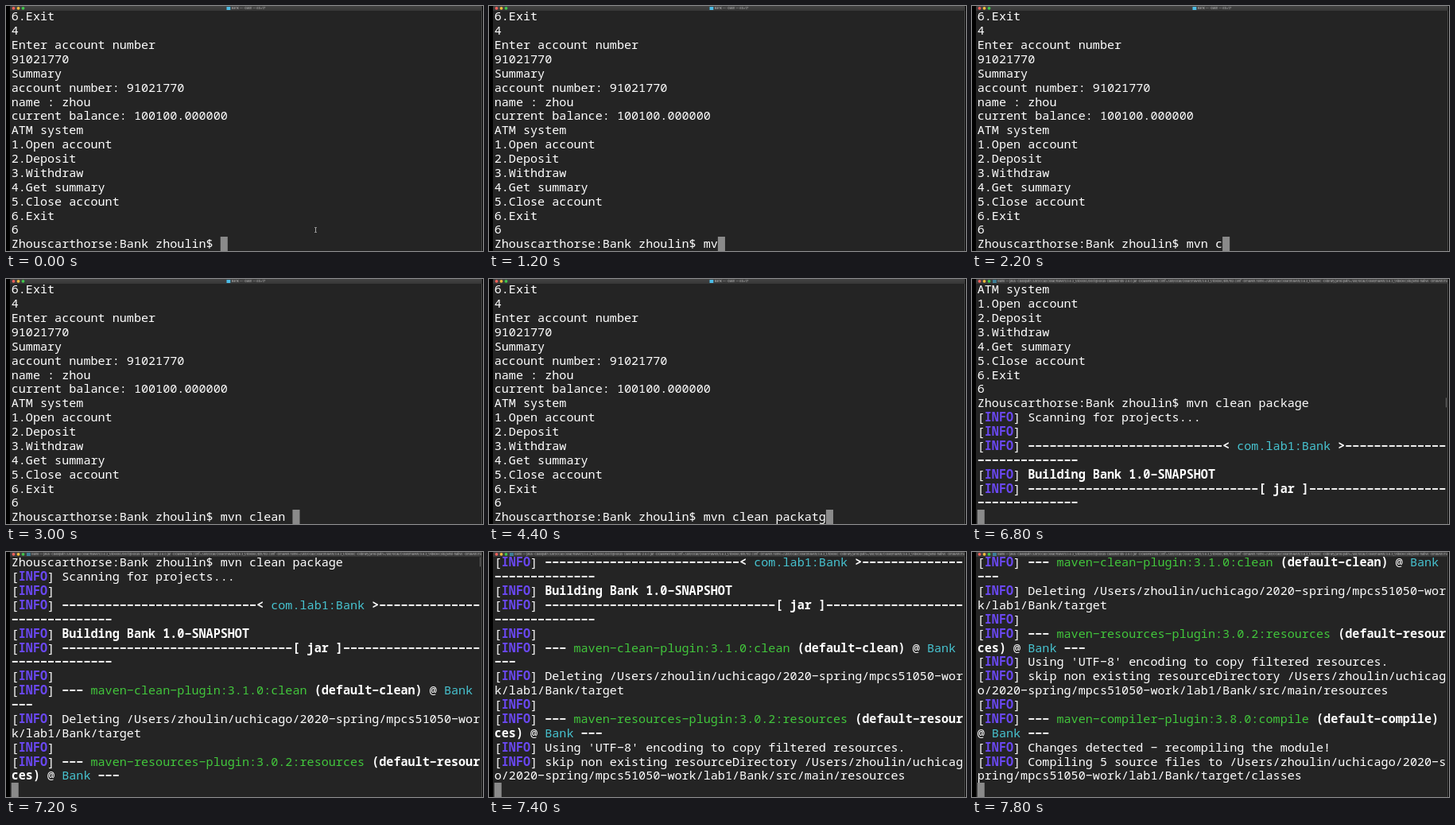
Animation, 600 px wide and 308 px high, one loop 8000 ms. Source, as an HTML page with a canvas:

```html
<!DOCTYPE html>
<html lang="en">
<head>
<meta charset="utf-8">
<title>Terminal build</title>
<style>
  html, body { margin: 0; width: 100%; height: 100%; overflow: hidden; background: #000; }
  canvas { display: block; width: 600px; height: 308px; }
</style>
</head>
<body>
<canvas id="stage" width="600" height="308"></canvas>
<script>
const ctx = document.getElementById('stage').getContext('2d');
const LOOP = 8000, COLS = 65, ROWS = 17;
const LEFT = 6.7, CELL_W = 9.07, CELL_H = 17.87, BASELINE = 18.4;
const MONO = '15.12px "Noto Sans Mono", monospace';
const WHITE = '#fff';

// Markup {xtext}: x picks the style
const STYLES = {
  n: { color: WHITE, weight: 500 },
  b: { color: WHITE, weight: 700 },
  p: { color: '#6a48f2', weight: 700 },
  g: { color: '#42c73c', weight: 500 },
  c: { color: '#47c3d0', weight: 500 }
};

const MENU = ['ATM system', '1.Open account', '2.Deposit', '3.Withdraw',
  '4.Get summary', '5.Close account', '6.Exit'];
const HISTORY = ['6.Exit', '4', 'Enter account number', '91021770', 'Summary',
  'account number: 91021770', 'name : zhou', 'current balance: 100100.000000',
  ...MENU, '6'];
const PROMPT = 'Zhouscarthorse:Bank zhoulin$ ';

const TYPING = [
  [0, ''], [1000, 'm'], [1200, 'mv'], [1600, 'mvn'], [1800, 'mvn '],
  [2200, 'mvn c'], [2400, 'mvn cl'], [2600, 'mvn clea'], [2800, 'mvn clean'],
  [3000, 'mvn clean '], [3600, 'mvn clean pa'], [3800, 'mvn clean pack'],
  [4000, 'mvn clean packa'], [4400, 'mvn clean packatg'],
  [4800, 'mvn clean packat'], [5000, 'mvn clean packa'],
  [5200, 'mvn clean packag'], [5400, 'mvn clean package']
];
const ENTER = 5600, TITLE_CHANGE = 5800, POINTER_MOVE = 200, POINTER_HIDE = 800;

const info = text => '[{pINFO}] ' + text;
const dashes = n => '-'.repeat(n);
const plugin = (goal, run) => info(`{b---} {g${goal}} {b(${run})} @ {cBank} {b---}`);
const REPO = '/Users/zhoulin/uchicago/2020-spring/mpcs51050-work/lab1/Bank';

const OUTPUT = [
  [6800, info('Scanning for projects...')],
  [6800, info('')],
  [6800, info(`{b${dashes(27)}<} {ccom.lab1:Bank} {b>${dashes(28)}}`)],
  [6800, info('{bBuilding Bank 1.0-SNAPSHOT}')],
  [6800, info(`{b${dashes(32)}[ jar ]${dashes(33)}}`)],
  [7000, info('')],
  [7000, plugin('maven-clean-plugin:3.1.0:clean', 'default-clean')],
  [7000, info(`Deleting ${REPO}/target`)],
  [7200, info('')],
  [7200, plugin('maven-resources-plugin:3.0.2:resources', 'default-resources')],
  [7400, info("Using 'UTF-8' encoding to copy filtered resources.")],
  [7400, info(`skip non existing resourceDirectory ${REPO}/src/main/resources`)],
  [7600, info('')],
  [7600, plugin('maven-compiler-plugin:3.8.0:compile', 'default-compile')],
  [7800, info('Changes detected - recompiling the module!')],
  [7800, info(`Compiling 5 source files to ${REPO}/target/classes`)]
];

const MAVEN = '/usr/local/Cellar/maven/3.6.3_1/libexec';
const SHELL_TITLE = 'Bank — -bash — 65×17';
const JAVA_TITLE = `Bank — java -classpath ${MAVEN}/boot/plexus-classworlds-2.6.0.jar ` +
  `-Dclassworlds.conf=${MAVEN}/bin/m2.conf -Dmaven.home=${MAVEN} ` +
  `-Dlibrary.jansi.path=${MAVEN}/lib/jansi-native -Dmaven.mu…`;

// Turn marked-up text into rows of styled characters
function wrap(text) {
  const cells = [];
  for (const [, style, styled, plain] of text.matchAll(/\{(\w)([^}]*)\}|([^{]+)/g)) {
    for (const ch of styled ?? plain) cells.push({ ch, style: STYLES[style || 'n'] });
  }
  const rows = [];
  do rows.push(cells.splice(0, COLS)); while (cells.length);
  return rows;
}

function screenAt(t) {
  const typed = TYPING.filter(([at]) => at <= t).pop()[1];
  const lines = [...HISTORY, PROMPT + typed];
  if (t >= ENTER) {
    lines.push(...OUTPUT.filter(([at]) => at <= t).map(([, text]) => text), '');
  }
  return lines.flatMap(wrap).slice(-ROWS);
}

function rect(color, x, y, w, h) {
  ctx.fillStyle = color;
  ctx.fillRect(x, y, w, h);
}

function drawTitleBar(t) {
  const bar = ctx.createLinearGradient(0, 0, 0, 6);
  bar.addColorStop(0, '#434343');
  bar.addColorStop(1, '#373737');
  ctx.fillStyle = bar;
  ctx.beginPath();
  ctx.roundRect(5, 0, 594, 6, [2, 2, 0, 0]);
  ctx.fill();
  ['#f4605a', '#f5bd3c', '#40c84c'].forEach((color, i) => {
    ctx.fillStyle = color;
    ctx.beginPath();
    ctx.arc(9.5 + i * 6, 2.8, 1.9, 0, Math.PI * 2);
    ctx.fill();
  });

  const running = t >= TITLE_CHANGE;
  const x = running ? 26 : 277.5;
  rect(running ? '#3d7f98' : '#4cbce6', x, 1, 4.8, 4);
  ctx.save();
  ctx.beginPath();
  ctx.rect(5, 0, 593, 6);
  ctx.clip();
  ctx.font = '3.83px Inter, sans-serif';
  ctx.fillStyle = '#b8b8b8';
  ctx.fillText(running ? JAVA_TITLE : SHELL_TITLE, x + 6.3, 4.3);
  ctx.restore();
}

// The minus sign gives the terminal's wide, high hyphen
const glyph = ch => ch === '-' ? '−' : ch;

function drawScreen(t) {
  const rows = screenAt(t);
  const last = rows.length - 1;
  rect('#8a8a8a', LEFT + rows[last].length * CELL_W, 290, CELL_W, 18);
  rows.forEach((row, r) => {
    const y = BASELINE + r * CELL_H;
    row.forEach(({ ch, style }, c) => {
      ctx.font = `${style.weight} ${MONO}`;
      ctx.fillStyle = style.color;
      ctx.fillText(glyph(ch), LEFT + c * CELL_W, y);
    });
    // Mark at the right edge of a submitted prompt
    const isPrompt = row.map(cell => cell.ch).join('').startsWith(PROMPT);
    if (isPrompt && t >= ENTER) rect('#6c6c6c', 596, y - 12, 1, 12);
  });
}

function drawPointer(t) {
  if (t >= POINTER_HIDE) return;
  const x = t < POINTER_MOVE ? 389 : 388;
  rect('#a8a8a8', x, 279, 1, 5);
  rect('#8c8c8c', x - 1, 278, 3, 1);
  rect('#8c8c8c', x - 1, 284, 3, 1);
}

function draw(now) {
  const t = now % LOOP;
  rect('#000', 0, 0, 600, 308);
  rect('#242424', 5, 0, 594, 308);
  rect('#4a4a4a', 598, 6, 1, 302);
  drawScreen(t);
  drawTitleBar(t);
  drawPointer(t);
}

const start = performance.now();
function tick() {
  draw(performance.now() - start);
  requestAnimationFrame(tick);
}
tick();
</script>
</body>
</html>
```
